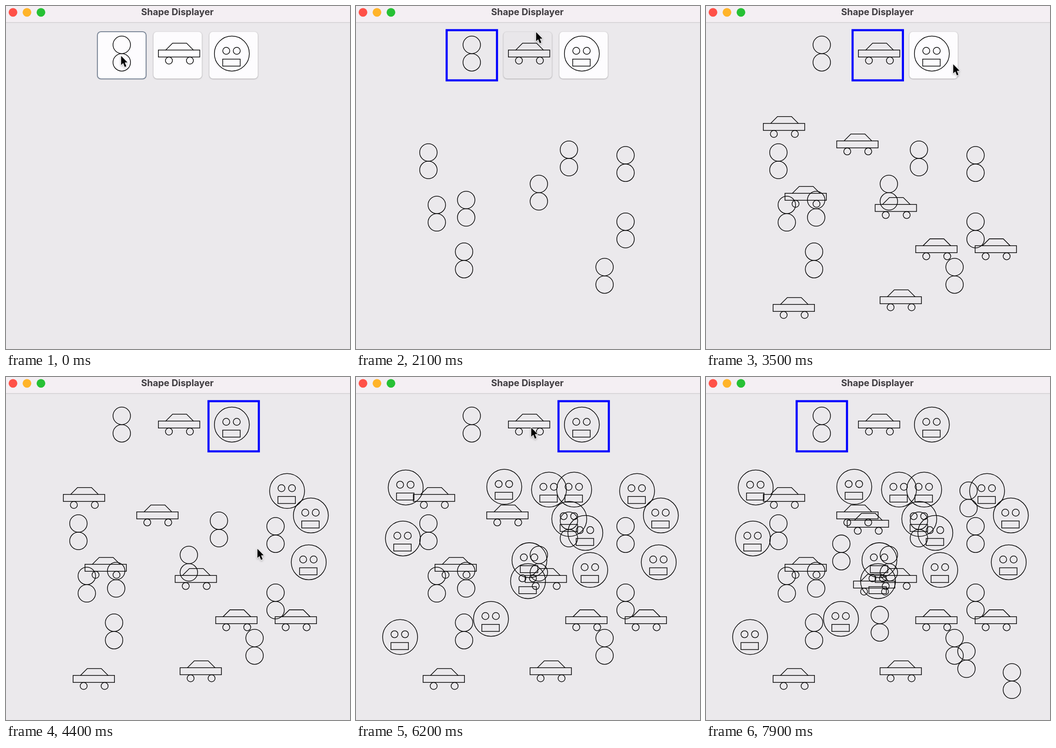
Animation of 749x747 px, one loop 8.2 s. Source, as an HTML page with a canvas:

```html
<!DOCTYPE html>
<html lang="en">
<head>
<meta charset="utf-8">
<title>Shape Displayer</title>
<style>
  html, body { margin: 0; width: 100%; height: 100%; overflow: hidden; background: #ebe9ec; }
  canvas { display: block; }
</style>
</head>
<body>
<canvas id="stage" width="749" height="747"></canvas>
<script>
const ctx = document.getElementById('stage').getContext('2d');
const TICK = 100, LOOP = 8200, LAST = 79;
const SCALE = 1.522; // stage pixels per window point; all drawing is in points
const GAP = 1.2;     // ticks between two stamps of one run
const kinds = ['snowman', 'car', 'face'];
const path = [], presses = [], stamps = [];

function move(tick, x, y) {
  path.push({ tick, x, y });
}

function press(kind, tick, x, y) {
  move(tick, x, y);
  presses.push({ kind, tick });
}

function stamp(kind, start, ...points) {
  points.forEach(([x, y], i) => {
    const tick = start + i * GAP;
    move(tick, x, y);
    stamps.push({ kind, tick, x, y });
  });
}

move(0, 164, 71);
press('snowman', 1, 164, 71);
stamp('snowman', 7.8, [103, 197], [157, 265], [115, 272], [154, 339], [261, 242],
  [304, 193], [355, 361], [385, 296], [385, 201]);
press('car', 21, 257, 37);
stamp('car', 23.4, [242, 264], [300, 323], [249, 396], [96, 407],
  [113, 248], [82, 148], [187, 173], [385, 323]);
move(35, 353, 83);
press('face', 36, 345, 79);
stamp('face', 41, [377, 138], [411, 173], [408, 240], [310, 251], [303, 198],
  [280, 178], [223, 237], [221, 267], [168, 321], [38, 347]);
move(54, 38, 319);
stamp('face', 55, [42, 206], [46, 133], [187, 132], [251, 136], [287, 136]);
press('car', 62, 250, 72);
stamp('car', 64, [202, 185], [211, 272]);
press('snowman', 67, 164, 79);
move(69, 161, 136);
stamp('snowman', 70.7, [193, 226], [248, 328], [372, 380], [437, 410], [375, 150]);
move(78, 394, 70);
move(LAST, 420, -40);

function pointer(tick) {
  const i = path.findIndex(p => p.tick > tick);
  if (i < 0) return path[path.length - 1];
  const a = path[i - 1], b = path[i];
  const k = (tick - a.tick) / (b.tick - a.tick), e = k * k * (3 - 2 * k);
  return { x: a.x + (b.x - a.x) * e, y: a.y + (b.y - a.y) * e };
}

function circle(x, y, r) {
  ctx.beginPath();
  ctx.arc(x, y, r, 0, Math.PI * 2);
}

function ring(x, y, r) {
  circle(x + 0.1, y + 0.1, r);
  ctx.stroke();
}

function trace(...points) {
  ctx.beginPath();
  points.forEach(([x, y]) => ctx.lineTo(x, y));
}

const shapes = {
  snowman() {
    ring(0.5, 12.5, 12.5);
    ring(0.5, 37.5, 12.5);
  },
  car() {
    ctx.strokeRect(0, 20, 59.2, 10);
    ring(15, 35, 5);
    ring(45, 35, 5);
    ctx.translate(0.3, 0.2);
    trace([10, 20], [20, 10], [40, 10], [50, 20]);
    ctx.stroke();
  },
  face() {
    ring(25, 25, 25);
    ring(17, 21, 5);
    ring(32, 21, 5);
    ctx.strokeRect(12, 33, 25, 10);
  }
};
const iconX = { snowman: 165, car: 218, face: 298 };

function drawShape(kind, x, y) {
  ctx.save();
  ctx.translate(x, y);
  ctx.strokeStyle = '#080808';
  ctx.lineWidth = 1;
  shapes[kind]();
  ctx.restore();
}

function drawWindow() {
  ctx.fillStyle = '#ebe9ec';
  ctx.fillRect(0, 0, 493, 491);
  ctx.fillStyle = '#f4eff3';
  ctx.fillRect(0, 0, 493, 23.2);
  ctx.fillStyle = '#cfcccf';
  ctx.fillRect(0, 23.2, 493, 0.9);
  ['#ff5148', '#ffb42a', '#27c135'].forEach((color, i) => {
    circle(10 + i * 20, 9.1, 6.2);
    ctx.fillStyle = color;
    ctx.fill();
  });
  ctx.fillStyle = '#3f3c40';
  ctx.font = '700 13.1px Inter, "Open Sans", sans-serif';
  ctx.textAlign = 'center';
  ctx.fillText('Shape Displayer', 245.2, 13.1);
}

function drawButton(kind, i, tick) {
  const x = 131 + i * 80;
  const first = presses.find(p => p.kind === kind).tick;
  const current = presses.filter(p => p.tick < tick).pop();
  if (tick <= first) {
    ctx.save();
    ctx.beginPath();
    ctx.roundRect(x, 37, 69.2, 66.8, 5);
    ctx.shadowColor = 'rgba(0,0,0,.35)';
    ctx.shadowBlur = 3;
    ctx.shadowOffsetY = 0.8;
    ctx.fillStyle = tick === first ? '#e9e7ea' : '#fdfcfe';
    ctx.fill();
    ctx.restore();
    if (kind === 'snowman') {
      ctx.beginPath();
      ctx.roundRect(x - 0.2, 36.8, 69.6, 67.5, 5);
      ctx.strokeStyle = '#7b8798';
      ctx.lineWidth = 1.3;
      ctx.stroke();
    }
  } else if (current.kind === kind) {
    ctx.strokeStyle = '#0000ff';
    ctx.lineWidth = 3;
    ctx.strokeRect(x - 1.3, 34.6, 72, 71.8);
  }
  drawShape(kind, iconX[kind], 43);
}

function drawPointer({ x, y }) {
  ctx.save();
  ctx.translate(x + 0.7, y + 0.4);
  trace([0, 0], [0, 13], [2.9, 10.3], [5.2, 15.8], [7.4, 14.8], [5.2, 9.4], [9, 9.2]);
  ctx.closePath();
  ctx.lineJoin = 'round';
  ctx.shadowColor = 'rgba(0,0,0,.3)';
  ctx.shadowBlur = 4;
  ctx.shadowOffsetY = 2;
  ctx.strokeStyle = '#f8f8f8';
  ctx.lineWidth = 1.3;
  ctx.stroke();
  ctx.shadowColor = 'transparent';
  ctx.fillStyle = '#000';
  ctx.fill();
  ctx.restore();
}

function render(ms) {
  const tick = Math.min(LAST, Math.floor((ms % LOOP) / TICK));
  ctx.setTransform(SCALE, 0, 0, SCALE, 0, 0);
  drawWindow();
  kinds.forEach((kind, i) => drawButton(kind, i, tick));
  stamps.filter(s => s.tick <= tick).forEach(s => drawShape(s.kind, s.x, s.y));
  drawPointer(pointer(tick));
}

function loop() {
  render(performance.now());
  requestAnimationFrame(loop);
}
loop();
</script>
</body>
</html>
```
